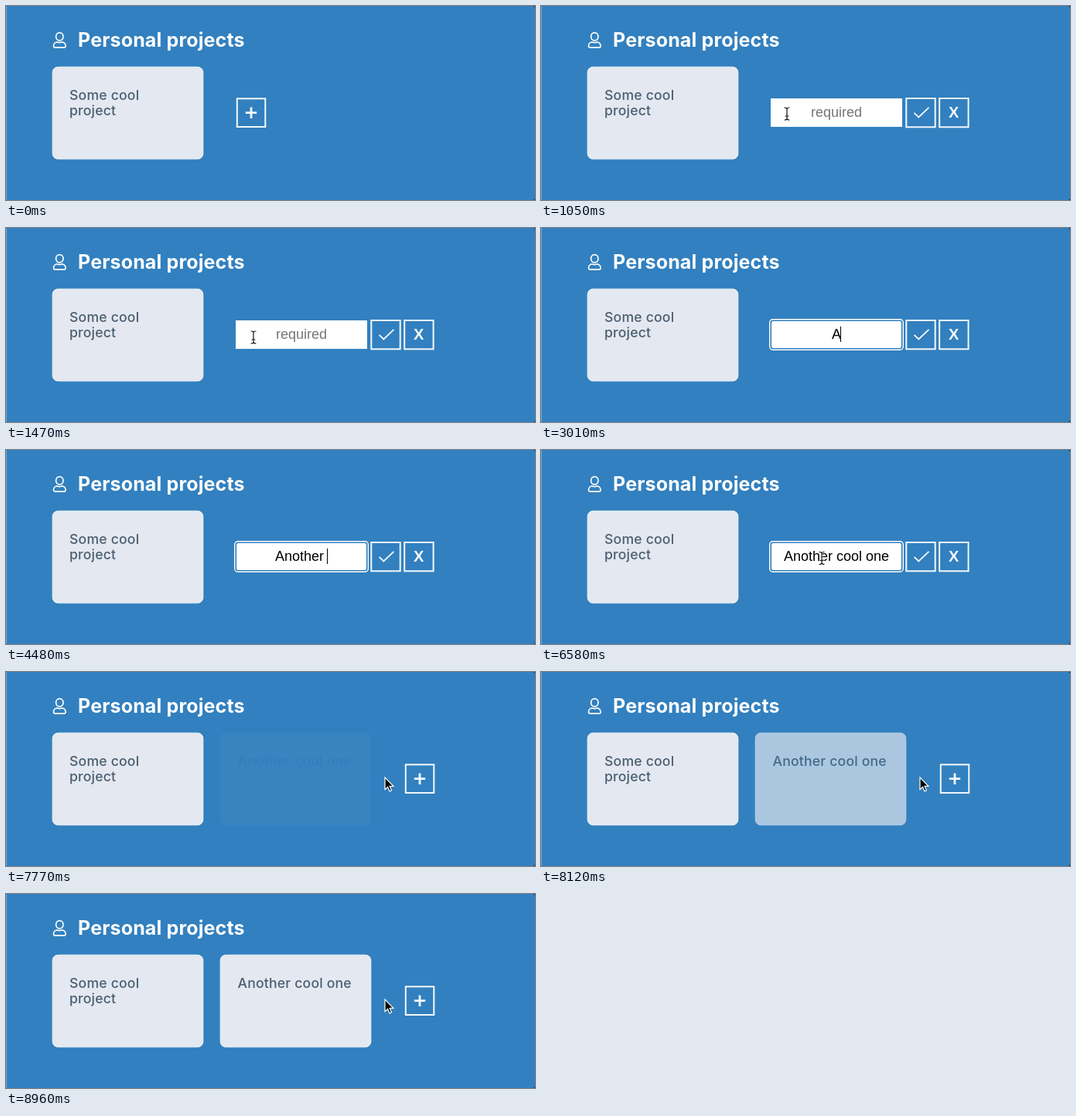
Animation, 684 px wide and 252 px high, one loop 9030 ms. Source, as an HTML page:

```html
<!DOCTYPE html>
<html lang="en">
<head>
<meta charset="utf-8">
<title>Personal projects</title>
<style>
  html, body { margin: 0; width: 100%; height: 100%; overflow: hidden; background: #3280bf; }
  #stage { position: relative; width: 684px; height: 252px; overflow: hidden; }
  svg { position: absolute; left: 0; top: 0; display: block; }
  text { font-family: Inter, "Open Sans", sans-serif; }
  .title { font-size: 25px; font-weight: 700; letter-spacing: .15px; fill: #fff; }
  .label { font-size: 17.6px; font-weight: 500; letter-spacing: .2px; fill: #4a5f70; }
  .card { fill: #e4e8f0; stroke: #f3f6fa; stroke-width: 1; }
  .line { fill: none; stroke: #f4f8fb; stroke-width: 2; }
  .close { font: 700 20px "Liberation Sans", Arial, sans-serif; fill: #f4f8fb; text-anchor: middle; }
  #field {
    position: absolute; left: 297px; top: 128px; width: 170px; height: 20px;
    display: flex; justify-content: center;
    font: 18px/20px "Liberation Sans", Arial, sans-serif; color: #000;
  }
  #hint { position: absolute; width: 100%; text-align: center; color: #757575; }
  #typed { position: relative; white-space: pre; height: 20px; }
  #caret { position: absolute; left: 100%; top: 0; width: 1px; height: 20px; margin-left: -1px; background: #000; }
</style>
</head>
<body>
<div id="stage">
  <svg width="684" height="252" viewBox="0 0 684 252">
    <rect width="684" height="252" fill="#3280bf"/>
    <rect width="1" height="252" fill="#fff" opacity=".35"/>
    <path d="M682 0h2v2zM682 252h2v-2z" fill="#16324a"/>
    <g fill="none" stroke="#fff" stroke-width="1.7">
      <ellipse cx="69.3" cy="39.7" rx="4.7" ry="5.1"/>
      <path d="M61.6 52.6v-1.1a4.6 4.6 0 0 1 4.6-4.6c1 0 1.6.7 3.1.7s2.1-.7 3.1-.7a4.6 4.6 0 0 1 4.6 4.6v1.1a1.3 1.3 0 0 1-1.3 1.3h-12.8a1.3 1.3 0 0 1-1.3-1.3z"/>
    </g>
    <text class="title" x="93" y="53">Personal projects</text>

    <rect class="card" x="60.2" y="79.2" width="194.6" height="119.6" rx="7"/>
    <text class="label" x="82" y="122.2">Some cool</text>
    <text class="label" x="82" y="142.2">project</text>

    <g id="added">
      <rect class="card" x="277.2" y="79.2" width="194.6" height="119.6" rx="7"/>
      <text class="label" x="299.5" y="122.2">Another cool one</text>
    </g>

    <g id="plus" class="line">
      <rect x="298.8" y="120.3" width="36.5" height="36.7"/>
      <path d="M309.8 138.7h14.4M317 131.5v14.4" stroke-width="2.8"/>
    </g>

    <g id="form">
      <rect id="plain" x="297" y="120" width="170" height="37" fill="#fff"/>
      <g id="focused">
        <rect x="295.7" y="118.8" width="172.6" height="39.4" rx="4" fill="none" stroke="#fff" stroke-width="1.4"/>
        <rect x="298.1" y="121.1" width="167.8" height="34.8" rx="2" fill="#fff"/>
      </g>
      <g class="line">
        <rect x="472.3" y="120" width="37.4" height="37.3"/>
        <rect x="515.2" y="120" width="37.4" height="37.3"/>
        <path d="M482.5 138.8l5.8 5.6 13.2-12.6" stroke-width="1.8"/>
      </g>
      <text class="close" x="533.7" y="145">X</text>
    </g>
  </svg>

  <div id="field">
    <span id="hint">required</span>
    <span id="typed"><span id="word"></span><i id="caret"></i></span>
  </div>

  <svg width="684" height="252" viewBox="0 0 684 252">
    <g id="arrow">
      <path d="M0 0V15.6L3.6 12.3 6 17.9 8.5 16.8 6.1 11.4H11Z" fill="#000" stroke="#fff" stroke-width="1.2"/>
    </g>
    <g id="beam" fill="none" stroke-linecap="round">
      <path id="bar" d="M-3-8Q0-8 0-6Q0-8 3-8M0-6V6M-3 8Q0 8 0 6Q0 8 3 8M-2 3H2" stroke="#fff" stroke-width="2.2"/>
      <use href="#bar" style="display:none"/>
      <path d="M-3-8Q0-8 0-6Q0-8 3-8M0-6V6M-3 8Q0 8 0 6Q0 8 3 8M-2 3H2" stroke="#111" stroke-width="1.2"/>
    </g>
  </svg>
</div>

<script>
const LOOP = 9030, STEP = 70;
const OPEN = 1050, FOCUS = 2100, BLUR = 7350, SAVE = 7700, FADE = 7720;
const WORDS = "Another cool one";
const KEYS = [2940, 3080, 3220, 3360, 3570, 3710, 3850, 4060,
              4550, 4690, 4830, 4970, 5110, 5390, 5600, 5810];
const easeIn = p => p * p;
const easeOut = p => 1 - (1 - p) * (1 - p);

// pointer stops: time, x, y, easing towards this stop
const PATH = [
  [0, 327, 256],
  [770, 318, 140, easeOut],
  [1050, 318, 140, easeOut],
  [1400, 320, 142, easeOut],
  [6300, 320, 142, easeOut],
  [6580, 363, 140.5, easeIn],
  [7000, 490, 137, easeOut],
  [LOOP, 490, 137, easeOut]
];

const $ = id => document.getElementById(id);
const show = (id, on) => { $(id).style.display = on ? "" : "none"; };

// cubic-bezier(.25, .1, .25, 1), solved by bisection
function ease(x) {
  if (x <= 0) return 0;
  if (x >= 1) return 1;
  const curve = (a, b, s) => 3 * a * s * (1 - s) ** 2 + 3 * b * s * s * (1 - s) + s ** 3;
  let lo = 0, hi = 1;
  for (let i = 0; i < 24; i++) {
    const mid = (lo + hi) / 2;
    if (curve(.25, .25, mid) < x) lo = mid; else hi = mid;
  }
  return curve(.1, 1, lo);
}

function pointerAt(t) {
  const i = Math.max(1, PATH.findIndex(stop => stop[0] > t));
  const [t0, x0, y0] = PATH[i - 1];
  const [t1, x1, y1, curve] = PATH[i];
  const p = curve((t - t0) / (t1 - t0));
  return [x0 + (x1 - x0) * p, y0 + (y1 - y0) * p];
}

function render(t) {
  const editing = t >= OPEN && t < SAVE;
  const focused = t >= FOCUS && t < BLUR;
  const count = KEYS.filter(k => k <= t).length;
  const lastKey = count ? KEYS[count - 1] : FOCUS;

  show("form", editing);
  show("field", editing);
  show("plus", !editing);
  $("plus").setAttribute("transform", t >= SAVE ? "translate(218 0)" : "");
  show("focused", focused);
  show("plain", !focused);

  show("hint", !count);
  $("word").textContent = WORDS.slice(0, count);
  show("caret", focused && (t - lastKey) % 1000 < 500);

  $("added").style.opacity = ease((t - FADE) / 1000);

  const [x, y] = pointerAt(t);
  const visible = t < KEYS[0] || t >= 6300;
  const overField = editing && x > 297 && x < 467;
  show("beam", visible && overField);
  show("arrow", visible && !overField);
  for (const id of ["beam", "arrow"]) $(id).setAttribute("transform", `translate(${x} ${y})`);
}

const start = performance.now();
function tick() {
  const t = (performance.now() - start) % LOOP;
  render(Math.floor(t / STEP) * STEP);
  requestAnimationFrame(tick);
}
tick();
</script>
</body>
</html>
```
